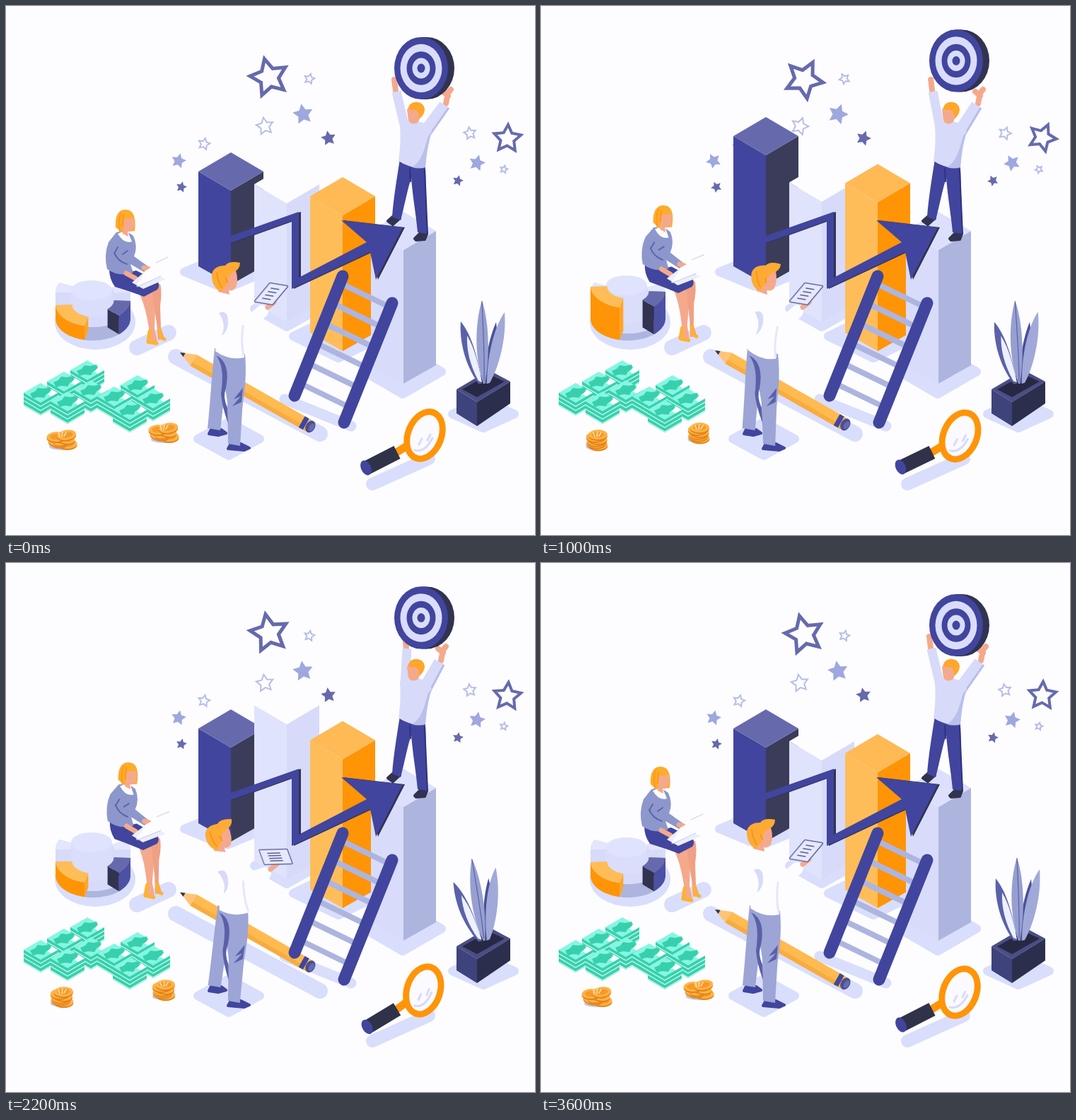
These frames come from a looping animation (748x748 px, 3.65 s). An HTML page with a canvas:

```html
<!DOCTYPE html>
<html lang="en">
<head>
<meta charset="utf-8">
<title>Growth</title>
<style>
html, body { margin: 0; width: 100%; height: 100%; overflow: hidden; background: #fdfdff; }
canvas { display: block; width: 748px; height: 748px; }
</style>
</head>
<body>
<canvas id="stage" width="748" height="748"></canvas>
<script>
const g = document.getElementById('stage').getContext('2d');
const LOOP = 3650, STEP = 50, LONG = 1800, MID = 1200, SHORT = 900;
const BG = '#fdfdff', SHADE = '#d9defc', PALE = '#d7dbf9', MIST = '#adb5df', BLUE = '#41459d',
  SLATE = '#666aad', NIGHT = '#313350', ORANGE = '#ff9407', AMBER = '#ffbd5a', SKIN = '#f5a98c',
  PERI = '#9ea8de', LILAC = '#b7bde7', MINT = '#86f6e3', GREEN = '#38d0ac';

// Drawing helpers
function poly(color, ...p) {
  g.fillStyle = color;
  g.beginPath();
  for (let i = 0; i < p.length; i += 2) g.lineTo(p[i], p[i + 1]);
  g.fill();
}
function shape(color, d) {
  g.fillStyle = color;
  g.fill(new Path2D(d));
}
function line(color, w, d, cap = 'round') {
  g.strokeStyle = color;
  g.lineWidth = w;
  g.lineCap = cap;
  g.lineJoin = 'round';
  g.stroke(new Path2D(d));
}
function soft(color, w, d) {
  shape(color, d);
  line(color, w, d);
}
function oval(color, x, y, rx, ry, rot = 0) {
  g.fillStyle = color;
  g.beginPath();
  g.ellipse(x, y, rx, ry, rot, 0, 7);
  g.fill();
}
function move(x, y, draw) {
  g.save();
  g.translate(x, y);
  draw();
  g.restore();
}
function turn(x, y, deg, draw) {
  move(x, y, () => {
    g.rotate(deg * Math.PI / 180);
    g.translate(-x, -y);
    draw();
  });
}
const rhomb = (x, y, rx, ry) => `M${x - rx} ${y}L${x} ${y - ry}L${x + rx} ${y}L${x} ${y + ry}Z`;
const pad = (x, y, rx, ry) => soft(SHADE, 12, rhomb(x, y, rx - 6, ry - 6));

// Motion helpers
const mix = (a, b, u) => a + (b - a) * u;
const clamp = u => Math.min(1, Math.max(0, u));
const ease = (t, a, b) => (1 - Math.cos(Math.PI * clamp((t - a) / (b - a)))) / 2;
// Eases up from a to b and back down from c to d, once per period
const swell = (t, period, a, b, c, d) => ease(t % period, a, b) - ease(t % period, c, d);
const wave = (t, period) => Math.sin(2 * Math.PI * t / period);
const hop = t => 1 - Math.abs(2 * (t % MID) / MID - 1) ** 3;

function shadows() {
  pad(310, 376, 64, 30);
  pad(397, 428, 52, 32);
  pad(470, 467, 70, 37);
  pad(561, 517, 61, 38);
  pad(315, 612, 50, 30);
  pad(675, 577, 50, 26);
  line(SHADE, 22, 'M185 483L230 462');
  line(SHADE, 22, 'M240 496L444 605');
  line(SHADE, 15, 'M394 556L488 594');
  line(SHADE, 18, 'M518 676L598 640');
}

function star(x, y, r, a, color, w) {
  const size = w ? r - w * .8 : r;
  g.beginPath();
  for (let i = 0; i < 10; i++) {
    const q = (a - 90 + i * 36) * Math.PI / 180, s = i % 2 ? size * .5 : size;
    g.lineTo(x + s * Math.cos(q), y + s * Math.sin(q));
  }
  g.closePath();
  g.fillStyle = g.strokeStyle = color;
  g.lineWidth = w;
  g.lineJoin = 'miter';
  w ? g.stroke() : g.fill();
}
function stars(t) {
  const a = -14 + 43 * swell(t, LONG, 300, 870, 870, LONG), dy = 3 * wave(t - 800, LONG);
  star(372, 102 + dy, 31, a, SLATE, 5);
  star(709, 187 - dy / 2, 23, a / 2 + 10, SLATE, 4);
  const group = (color, w, ...list) => list.forEach(([x, y, r], i) => star(x, y, r, i % 2 ? a * .7 : -a, color, w));
  group(LILAC, 2, [429, 103, 9], [366, 170, 14], [280, 195, 10], [656, 180, 10.5], [704, 231, 7]);
  group(PERI, 0, [244, 219, 11], [420, 153, 15], [666, 222, 12]);
  group(SLATE, 0, [248, 256, 8], [456, 187, 11], [639, 247, 8]);
}

function bar(x, top, base, cTop, cLeft, cRight) {
  poly(cLeft, x - 46, top + 27, x, top + 54, x, base, x - 46, base - 26);
  poly(cRight, x, top + 54, x + 46, top + 27, x + 46, base - 26, x, base);
  shape(cTop, rhomb(x, top + 27, 46, 27));
}
function bars(t) {
  const blue = 207 - 50 * swell(t, LONG, 550, 950, 1450, LONG);
  const pale = 225 - 51 * swell(t, LONG, 100, 400, 400, 1100);
  const gold = 242 - 54 * swell(t, MID, 0, 300, 300, 560) - 37 * swell(t, MID, 540, 800, 800, MID);
  bar(318, blue, 394, SLATE, BLUE, '#3b3c59');
  bar(397, pale, 447, BG, '#e0e3fc', PALE);
  bar(476, gold, 488, '#ffb955', AMBER, ORANGE);
  bar(562, 291, 534, '#dce0fc', '#d8dcfa', MIST);
}

function growthArrow() {
  const band = 'M318 326L417 291V384L513 334L477 303L564 313L526 387L518 348L407 400V304L318 336Z';
  shape(NIGHT, band);
  move(-3, 0, () => shape(BLUE, band));
}

function ladder() {
  for (let i = 0; i < 6; i++) line(MIST, 8, `M${475 - i * 11.2} ${393 + i * 28.4}l66 32`);
  line(BLUE, 17, 'M476 382L408 551M546 420L478 589');
}

function target(y) {
  oval(NIGHT, 595, y, 39, 44);
  g.fillStyle = NIGHT;
  g.fillRect(587, y - 44, 8, 88);
  [38, 29.5, 20.5, 12.5, 5.5].forEach((r, i) => oval(i % 2 ? '#d9ddfb' : BLUE, 587, y, r, r * 1.16));
}

function winner(t) {
  const inward = swell(t, LONG, 100, 400, 550, 850), narrow = swell(t, LONG, 850, 1250, 1400, LONG);
  const lx = 551 + 15 * inward + 7 * narrow, rx = 626 - 7 * inward - 13 * narrow;
  line(SKIN, 8, `M${lx} 120l-2 -16M${rx - 4} 138l3 -15l4 -5m-4 9l-7 -6`);
  line(PALE, 13, `M564 172L${lx + 1} 121`, 'butt');
  line(PALE, 16, `M587 184L${rx - 6} 140`, 'butt');
  line('#b6bde8', 3, `M598 184L${rx} 144`, 'butt');
  target(88 - 15 * hop(t));

  soft(NIGHT, 4, 'M540 304L549 296L557 300L547 309Z');
  soft(NIGHT, 4, 'M578 329L586 321L595 322L592 330L580 331Z');
  shape(BLUE, 'M557 216C552 248 548 272 546 298L558 303C564 280 568 258 573 243C575 270 580 296 582 320L596 322C594 285 594 255 593 228Z');
  line('#2f327c', 2, 'M571 230L572 248M592 232L596 322');
  shape(PALE, 'M558 164C564 160 582 161 597 168L602 178C597 190 595 208 593 228C580 231 566 226 555 219C558 198 558 184 557 170Z');
  shape('#b9c0ea', 'M597 184C592 200 589 219 574 228Q585 231 593 228Q595 200 602 178Z');
  shape(SKIN, 'M567 147C571 137 586 140 588 150L583 164Q574 170 569 162Z');
  shape('#ffa62b', 'M569 144C571 132 592 133 592 147Q591 155 584 160Q586 151 579 147Q570 148 569 144Z');
}

// One dart, u milliseconds after launch: stretches out, flies, then sinks into the board
function dart(u) {
  if (u < 0 || u >= 165) return;
  const curve = x => 82 * clamp((583 - x) / 137) ** 2.3;
  const hx = 470 + 113 * clamp(u / 150) ** 1.25;
  const tx = hx - 95 * Math.sin(Math.PI * (u / 165) ** 1.6);
  const hy = 75 + curve(hx), ty = 75 + curve(tx) * (1 - .5 * ease(u, 75, 115));
  const len = Math.hypot(hx - tx, hy - ty), s = Math.min(1, len / 75);
  const cx = (hx + tx) / 2 - len * .03, cy = (hy + ty) / 2 - len * .09;
  const angle = (x, y) => Math.atan2(y, x) * 180 / Math.PI;
  line(ORANGE, 2.8 * s, `M${tx} ${ty}Q${cx} ${cy} ${hx} ${hy}`);
  if (len < 20) return;
  turn(hx, hy, angle(hx - cx, hy - cy), () =>
    poly(ORANGE, hx + 1, hy, hx - 11 * s, hy - 6 * s, hx - 11 * s, hy + 6 * s));
  turn(tx, ty, angle(cx - tx, cy - ty), () => {
    for (const x of [tx + 2, tx + 7])
      line(ORANGE, 2.4 * s, `M${x} ${ty - 6 * s}L${x + 9 * s} ${ty}L${x} ${ty + 6 * s}`);
  });
}
function darts(t) {
  for (const volley of [125, 433])
    for (const gap of [0, 70]) dart(t % MID - volley - gap);
}

function slice(a0, a1, h, cTop, cSide, cCap) {
  const at = (a, r, z) => [123 + 53 * r * Math.cos(a * Math.PI / 180), 442 - z + 31 * r * Math.sin(a * Math.PI / 180)];
  const arc = (r, z) => Array.from({ length: 13 }, (_, i) => at(mix(a0, a1, i / 12), r, z));
  const fill = (c, pts) => poly(c, ...pts.flat());
  for (const a of [a0, a1]) fill(cCap, [at(a, .56, 0), at(a, 1, 0), at(a, 1, h), at(a, .56, h)]);
  fill(cSide, [...arc(1, 0), ...arc(1, h).reverse()]);
  fill(cTop, [...arc(1, h), ...arc(.56, h).reverse()]);
}
function pie(t) {
  const gold = 20 + 26 * swell(t, LONG, 380, 570, 1100, 1400);
  const dark = 26 + 13 * swell(t, LONG, 400, 850, 1250, LONG);
  const grey = 19 - 13 * swell(t, LONG, 100, 550, 850, 1250);
  const top = 402 - 10 * hop(t);
  oval(SHADE, 126, 447, 57, 39);
  slice(180, 207, 37, '#e3e6fd', PALE, PALE);
  slice(333, 358, 36, '#e3e6fd', PALE, PALE);
  oval('#dadefb', 121, 442, 29, 17);
  g.fillStyle = '#dadefb';
  g.fillRect(92, top, 58, 442 - top);
  oval('#e0e3fd', 121, top, 29, 14);
  slice(46, 103, grey, PALE, MIST, LILAC);
  slice(103, 178, gold, '#ffbd58', ORANGE, '#ffa428');
  slice(2, 46, dark, SLATE, '#4c51a4', NIGHT);
}

function worker(t) {
  const h = hop(t);
  move(0, -8 * h, () => turn(180, 388, 3.8 * h, () => {
    shape(SKIN, 'M187 398L204 394Q213 405 211 424L210 456L214 474L203 476L202 455Q198 428 190 410Z');
    shape('#f0a084', 'M202 396L218 393Q221 404 218 424L219 455L224 470L215 472L213 448Q209 425 207 408Z');
    line('#ffb22e', 5, 'M203 460L201 475L213 477M217 458L219 469L224 471');
    shape(BLUE, 'M146 372Q164 380 184 374L213 388Q219 394 214 401L195 411Q180 405 154 397Q146 386 146 372Z');
    shape('#8d97cc', 'M156 320Q169 316 180 325Q187 340 181 354L202 369L195 376L176 365L180 377Q160 384 143 372Q138 352 145 334Z');
    line('#5e65ad', 2, 'M153 349Q158 361 171 365M158 341L153 350M172 346L165 351');
    shape(BG, 'M158 322L171 316L178 333Q167 337 158 322Z');
    line(SKIN, 7, 'M170 378L183 385M195 370L202 372');
    poly('#eceefd', 178, 391, 197, 375, 226, 386, 194, 400);
    poly(BG, 184, 397, 198, 374, 230, 354, 219, 382);
    line('#c6cbed', 1, 'M186 397L219 382M212 363L229 355');
    shape('#ffab2c', 'M155 313C154 296 159 288 169 288C181 288 184 300 182 318L164 320Z');
    shape(SKIN, 'M167 300Q174 302 181 299L181 312Q178 320 172 319L173 326L165 322Z');
    line('#ff981a', 2, 'M162 294Q158 304 161 318M166 296L165 311');
  }));
}

function bill(x, y) {
  poly(GREEN, x - 24, y, x + 24, y, x + 24, y + 6, x, y + 20, x - 24, y + 6);
  line('#c9fbf1', 1.3, `M${x - 24} ${y + 5}L${x} ${y + 19}L${x + 24} ${y + 5}`);
  shape(MINT, rhomb(x, y, 24, 14));
  shape(GREEN, `M${x - 15} ${y + 1}l7 -3l4 -5l8 1l9 -2l2 6l-7 4l-3 5l-9 -1l-7 2z`);
  poly(BG, x + 16, y - 5, x + 24, y, x + 15, y + 5, x + 10, y + 2);
}
// Upper layers leave first and highest, lower ones follow
function lift(t, level) {
  const from = mix(160, 0, level);
  return mix(36, 50, level) * Math.sin(Math.PI * clamp((t % MID - from) / (645 - from)) ** mix(1, .55, level));
}
function money(t) {
  for (const [x, y, count] of [[49, 547, 3], [87, 559, 2], [153, 552, 2], [175, 571, 2]])
    for (let i = count - 1; i >= 0; i--)
      for (let n = 0; n < 3; n++) bill(x + 33 * i, y - 16 * i + 12 - 6 * n - lift(t, n / 2));
}

function coins(t, x, y) {
  const w = 1 - swell(t, LONG, 150, 560, 900, 1230);
  oval('#c3c8e8', x, y + 11, 15 + 3 * w, 5);
  for (let i = 0; i < 6; i++) {
    const cx = x + 8 * w * Math.cos(i * 2.4), cy = y + mix(9 - i * 3, 7 - i * 2.5, w);
    const tilt = w * .25 * Math.sin(i * 2.4);
    oval('#e2841a', cx, cy + 2, 13.5, 7, tilt);
    oval('#ffb347', cx, cy, 13.5, 7, tilt);
    oval('#f59a2a', cx, cy, 9, 4.2, tilt);
  }
  line('#ffe0ae', 1.5, `M${x - 5} ${y - 9}l2 6M${x + 1} ${y - 10}l-1 7M${x + 6} ${y - 9}l-3 5`);
}

function pencil(t) {
  move(0, -28 * swell(t, SHORT, 50, 290, 350, 560), () => turn(246, 490, 29.6, () => {
    poly('#ffc477', 246, 490, 268, 481, 268, 499);
    poly(NIGHT, 246, 490, 253, 487, 253, 493);
    poly('#ffba50', 268, 481, 455, 481, 455, 499, 268, 499);
    poly('#f8ac3f', 268, 493, 455, 493, 455, 499, 268, 499);
    poly(BLUE, 444, 481, 451, 481, 451, 499, 444, 499);
    oval('#4a4f93', 458, 490, 6.5, 9);
    oval(SLATE, 460, 490, 3.5, 6);
  }));
}

function reader(t) {
  const lean = swell(t, LONG, 600, 850, 850, 1250) - swell(t, LONG, 0, 400, 400, 700);
  const flat = swell(t, LONG, 200, 400, 600, 800), sway = -4.5 * lean;
  soft(BLUE, 4, 'M287 605L291 597L304 599L311 604L300 607Z');
  soft(BLUE, 4, 'M314 626L319 617L332 619L344 625L337 628Z');
  g.save();
  g.transform(1, 0, -sway / 130, 1, sway * 615 / 130, 0);
  shape('#9ca5d5', 'M295 484L338 492C341 530 336 548 334 572L331 622L314 619L313 560L310 540L303 600L285 597C289 560 291 520 295 484Z');
  shape('#5a60a8', 'M297 494Q318 504 311 540Q306 552 313 568L314 590Q305 565 304 548Q310 510 297 494ZM335 540L322 556L332 552L320 566L333 560Z');
  g.restore();
  move(sway, 0, () => turn(317, 480, 8 * lean, () => {
    shape(BG, 'M297 404Q310 398 328 408Q341 420 340 445Q336 470 337 497Q316 502 296 488Q300 462 292 428Q288 412 297 404Z');
    shape(PALE, 'M301 434Q315 428 314 450Q312 462 305 466Q312 450 301 434Z');
    line('#e4e7fb', 3, 'M335 452Q332 476 336 494');
    shape(SKIN, 'M300 382L325 374Q329 388 325 398Q320 404 315 401L316 408L300 404Z');
    shape('#ffab33', 'M291 379Q294 367 310 367Q315 360 331 363Q331 373 320 377Q313 382 312 394L304 404Q290 397 291 379Z');
    line('#f59520', 2, 'M298 377Q300 392 305 398M311 385l2 6');
  }));
  const hx = mix(374, 378, flat), hy = mix(423, 430, flat);
  line(BG, 18, `M${322 + lean * 4} 422L346 446L${hx - 12} ${hy + 9}`);
  line(SKIN, 7, `M${hx - 4} ${hy + 3}L${hx + 5} ${hy - 4}`);
  tablet(flat);
}
// A slanted card whose two edge directions blend between upright and flat
function tablet(flat) {
  const x = mix(375, 381.5, flat), y = mix(407, 415.5, flat);
  const at = (u, v) => [x + u * mix(24, 38, flat) + v * mix(-21, 7, flat), y + u * mix(4, -1, flat) + v * mix(25, 19, flat)];
  const d = `M${at(-.5, -.5)}L${at(.5, -.5)}L${at(.5, .5)}L${at(-.5, .5)}Z`;
  soft('#666ca9', 3.5, d);
  soft('#e6e9fb', .5, d);
  for (let v = -.28; v < .4; v += .19) line('#5a5f9c', 1.5, `M${at(-.25, v)}L${at(.2, v)}`);
}

function plant(t) {
  poly('#4a4e86', 637, 542, 683, 515, 713, 531, 666, 560);
  poly('#272944', 645, 542, 683, 521, 705, 531, 666, 553);
  turn(678, 534, -7 * swell(t, SHORT, 0, 350, 550, SHORT), () => {
    shape('#5b61a9', 'M668 534C648 506 641 472 643 446C659 466 667 497 673 534Z');
    shape('#edf0fd', 'M668 530C656 508 651 486 652 466C663 484 668 508 673 532Z');
    shape('#4b5097', 'M677 534C676 504 683 470 693 447C697 476 688 512 680 534Z');
    shape('#a0a9d8', 'M680 534C680 498 689 456 705 433C708 470 697 510 684 533Z');
    shape('#969fd0', 'M675 534C661 492 664 446 673 416C684 450 684 500 677 534Z');
    line('#5c62a6', 1.2, 'M673 418C675 460 677 500 676 530');
  });
  poly('#3f437b', 637, 542, 666, 560, 666, 594, 637, 576);
  poly('#2c2e4d', 666, 560, 713, 531, 713, 562, 666, 594);
}

function lens(t) {
  turn(552, 630, -4 * wave(t, LONG), () => {
    line(ORANGE, 11, 'M551 632L570 620', 'butt');
    line('#30324a', 20, 'M510 653L553 631', 'butt');
    oval(BLUE, 509, 653, 7, 11, -.45);
    oval(ORANGE, 592, 607, 28, 39, .38);
    oval('#fafaff', 592, 607, 19, 30, .38);
    line(PALE, 3, 'M578 628Q592 632 603 611M584 620L588 612M596 614L600 606');
  });
}

function frame(t) {
  g.fillStyle = BG;
  g.fillRect(0, 0, 748, 748);
  shadows();
  stars(t);
  bars(t);
  growthArrow();
  winner(t);
  darts(t);
  pie(t);
  worker(t);
  money(t);
  coins(t, 79, 612);
  coins(t, 223, 602);
  pencil(t);
  ladder();
  reader(t);
  plant(t);
  lens(t);
}

const start = performance.now();
function tick() {
  const t = (performance.now() - start) % LOOP;
  frame(Math.floor(t / STEP) * STEP);
  requestAnimationFrame(tick);
}
tick();
</script>
</body>
</html>
```
